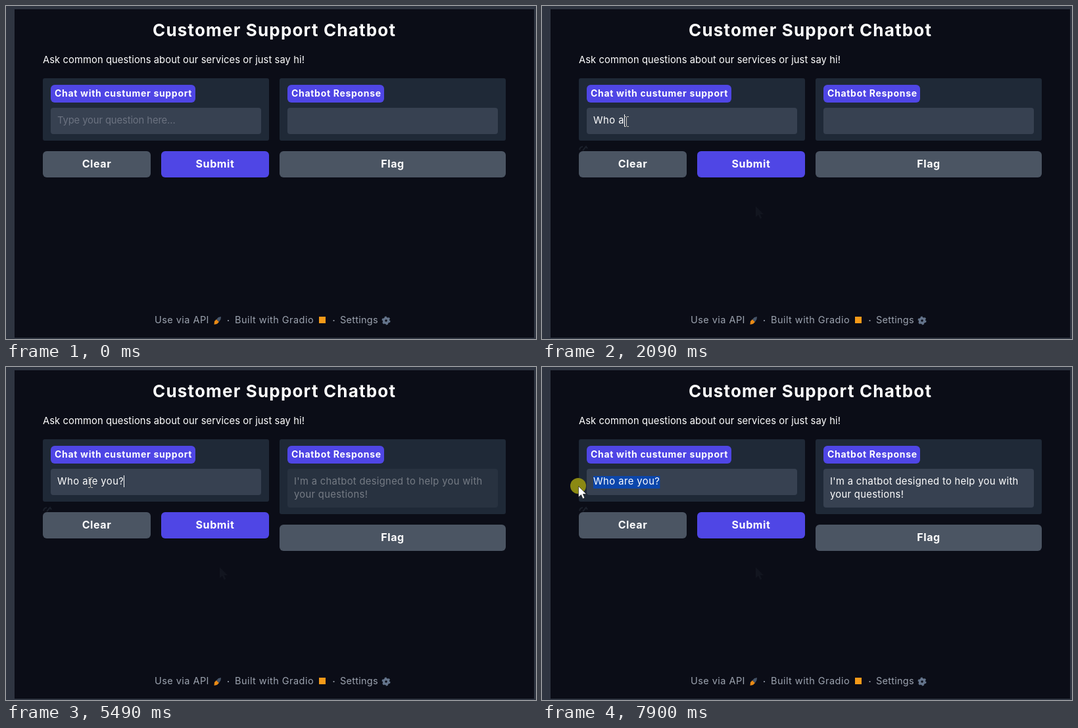
These frames come from a looping animation (806x507 px, 8 s). An HTML page:

```html
<!DOCTYPE html>
<html lang="en">
<head>
<meta charset="utf-8">
<title>Customer Support Chatbot</title>
<style>
  html, body { margin: 0; width: 100%; height: 100%; overflow: hidden; background: #2f3541; }
  svg { display: block; }
  text { font: 14.75px Inter, "Open Sans", sans-serif; fill: #fff; letter-spacing: .32px; white-space: pre; }
  .title { font-size: 26px; font-weight: 700; letter-spacing: 1.18px; }
  .label { font-size: 14px; font-weight: 700; letter-spacing: .69px; }
  .button { font-size: 16px; font-weight: 700; letter-spacing: .6px; text-anchor: middle; }
  .footer { font-size: 14.5px; fill: #9ca3af; letter-spacing: .45px; }
  .panel { fill: #1f2937; }
  .field { fill: #374151; }
  .gray { fill: #4b5563; }
  .accent { fill: #4f46e5; }
</style>
</head>
<body>
<svg width="806" height="507" viewBox="0 0 806 507">
  <defs>
    <path id="arrow" d="M0 0V16.5L4 13L6.6 19L9.4 17.8L6.8 12H12Z"/>
  </defs>
  <rect x="13" y="5" width="790" height="500" fill="#0b0d17"/>
  <text class="title" x="223" y="46">Customer Support Chatbot</text>
  <text x="56" y="87" style="letter-spacing:.08px">Ask common questions about our services or just say hi!</text>

  <rect class="panel" x="56" y="110" width="344" height="95" rx="3"/>
  <rect class="accent" x="68" y="120" width="220" height="27" rx="6"/>
  <text class="label" x="74" y="138">Chat with custumer support</text>
  <rect class="field" x="68" y="155" width="320" height="40" rx="4"/>

  <rect id="panel" class="panel" x="416" y="110" width="344" height="95" rx="3"/>
  <rect class="accent" x="428" y="120" width="147" height="27" rx="6"/>
  <text class="label" x="434" y="138">Chatbot Response</text>
  <g id="response">
    <rect id="answerBox" class="field" x="428" y="155" width="320" height="40" rx="4"/>
    <g id="answer">
      <text x="438" y="179">I'm a chatbot designed to help you with</text>
      <text x="438" y="199">your questions!</text>
    </g>
  </g>

  <rect class="gray" x="56" y="221" width="164" height="40" rx="6"/>
  <text class="button" x="138" y="246">Clear</text>
  <rect class="accent" x="236" y="221" width="164" height="40" rx="6"/>
  <text class="button" x="318" y="246">Submit</text>
  <g id="flag">
    <rect class="gray" x="416" y="221" width="344" height="40" rx="6"/>
    <text class="button" x="588" y="246">Flag</text>
  </g>

  <text class="footer" x="226" y="483">Use via API</text>
  <path d="M316.5 485L317 480L320 477L324 481L321 484Z" fill="#e98a15"/>
  <path d="M320 477L323 474L327 473L326.5 477L324 481Z" fill="#475569"/>
  <circle cx="338" cy="479" r="1.1" fill="#9ca3af"/>
  <text class="footer" x="348" y="483">Built with Gradio</text>
  <rect x="476" y="473" width="10" height="10" fill="#f59a18"/>
  <circle cx="498.5" cy="479" r="1.1" fill="#9ca3af"/>
  <text class="footer" x="508" y="483" style="letter-spacing:.25px">Settings</text>
  <g fill="none" stroke="#64748b">
    <circle cx="578" cy="479" r="3.5" stroke-width="3.5"/>
    <circle cx="578" cy="479" r="5.5" stroke-width="2" stroke-dasharray="2.88"/>
  </g>

  <use id="trailMid" href="#arrow" x="325" y="305" fill="#12151f"/>
  <path id="trailEnd" d="M57 219a6 6 0 0 1 5-5M62 220l5-6l2 3" fill="none" stroke="#1b202b" stroke-width="2"/>

  <rect id="selection" y="166" height="19" fill="#0b46ab"/>
  <text id="typed" x="78" y="179" style="letter-spacing:.47px"></text>
  <text id="hint" x="78" y="179" style="fill:#6b7280;letter-spacing:-.1px">Type your question here...</text>
  <rect id="caret" y="165" width="1" height="18" fill="#fff"/>
  <g id="mouse">
    <circle id="press" r="12" fill="#8b8913"/>
    <use id="pointer" href="#arrow" x=".5" y=".5" fill="#fff" stroke="#111" stroke-width=".6"/>
    <path id="beam" d="M-3-7.5h2.5l1 1l1-1h2.5M.5-6.5V6.5M-3 7.5h2.5l1-1l1 1h2.5" fill="none" stroke="#cfccc2"/>
  </g>
</svg>
<script>
const ui = {};
document.querySelectorAll("[id]").forEach(e => ui[e.id] = e);
const set = (e, attrs) => { for (const k in attrs) e.setAttribute(k, attrs[k]); };
const show = (e, on) => e.style.display = on ? "" : "none";
const within = (t, spans) => spans.some(([a, b]) => t >= a && t < b);

const LOOP = 8000, LEFT = 78, QUESTION = "Who are you";
const keyTimes = [1150, 1480, 1750, 1950, 2090, 2220, 2420, 2620, 3090, 3230, 3430];
const caretOn = [[620, 3960], [4160, 4690], [5030, 5560], [6090, 6630], [7160, 7700]];
const pressed = [[480, 620], [7700, LOOP]];
// time, x, y: the mouse jumps from point to point
const path = [
  [70, 655, 462], [140, 325, 305], [210, 57, 210], [270, 92, 188], [340, 128, 176],
  [7030, 132, 177], [7100, 144, 178], [7160, 159, 179], [7230, 175, 180],
  [7300, 190, 180], [7360, 200, 180], [7430, 207, 180], [7500, 210, 180],
  [7770, 160, 180], [7830, 98, 181], [7900, 55, 181]
];

function typedAt(t) {
  if (t >= 5030) return QUESTION + "?";
  const text = QUESTION.slice(0, keyTimes.filter(k => k <= t).length);
  return t >= 4160 && t < 4830 ? text + "/" : text;
}

function drawInput(t, mouseX) {
  const text = typedAt(t);
  ui.typed.textContent = text;
  show(ui.hint, !text);
  const end = LEFT + (text ? ui.typed.getComputedTextLength() : 0);
  show(ui.caret, within(t, caretOn));
  set(ui.caret, { x: Math.round(end) });
  const start = Math.min(end, Math.max(LEFT, mouseX));
  set(ui.selection, { x: start, width: t >= 7700 ? end - start : 0 });
}

function drawResponse(t) {
  const grow = t >= 5490 ? 19 : 0;
  set(ui.panel, { height: 95 + grow });
  set(ui.answerBox, { height: 40 + grow });
  set(ui.flag, { transform: `translate(0 ${grow})` });
  show(ui.answer, grow);
  set(ui.response, { opacity: t >= 5490 && t < 5560 ? .38 : 1 });
}

function drawMouse(t, spot) {
  show(ui.mouse, spot);
  show(ui.trailMid, t >= 210);
  show(ui.trailEnd, t >= 270);
  if (!spot) return;
  const [, x, y] = spot;
  const inField = x > 68 && x < 388 && y > 155 && y < 195;
  set(ui.mouse, { transform: `translate(${x} ${y})` });
  show(ui.beam, inField);
  show(ui.pointer, !inField);
  show(ui.press, within(t, pressed));
}

function frame(now) {
  const t = now % LOOP;
  const spot = path.filter(p => p[0] <= t).pop();
  drawInput(t, spot ? spot[1] : 0);
  drawResponse(t);
  drawMouse(t, spot);
  requestAnimationFrame(frame);
}
requestAnimationFrame(frame);
</script>
</body>
</html>
```
